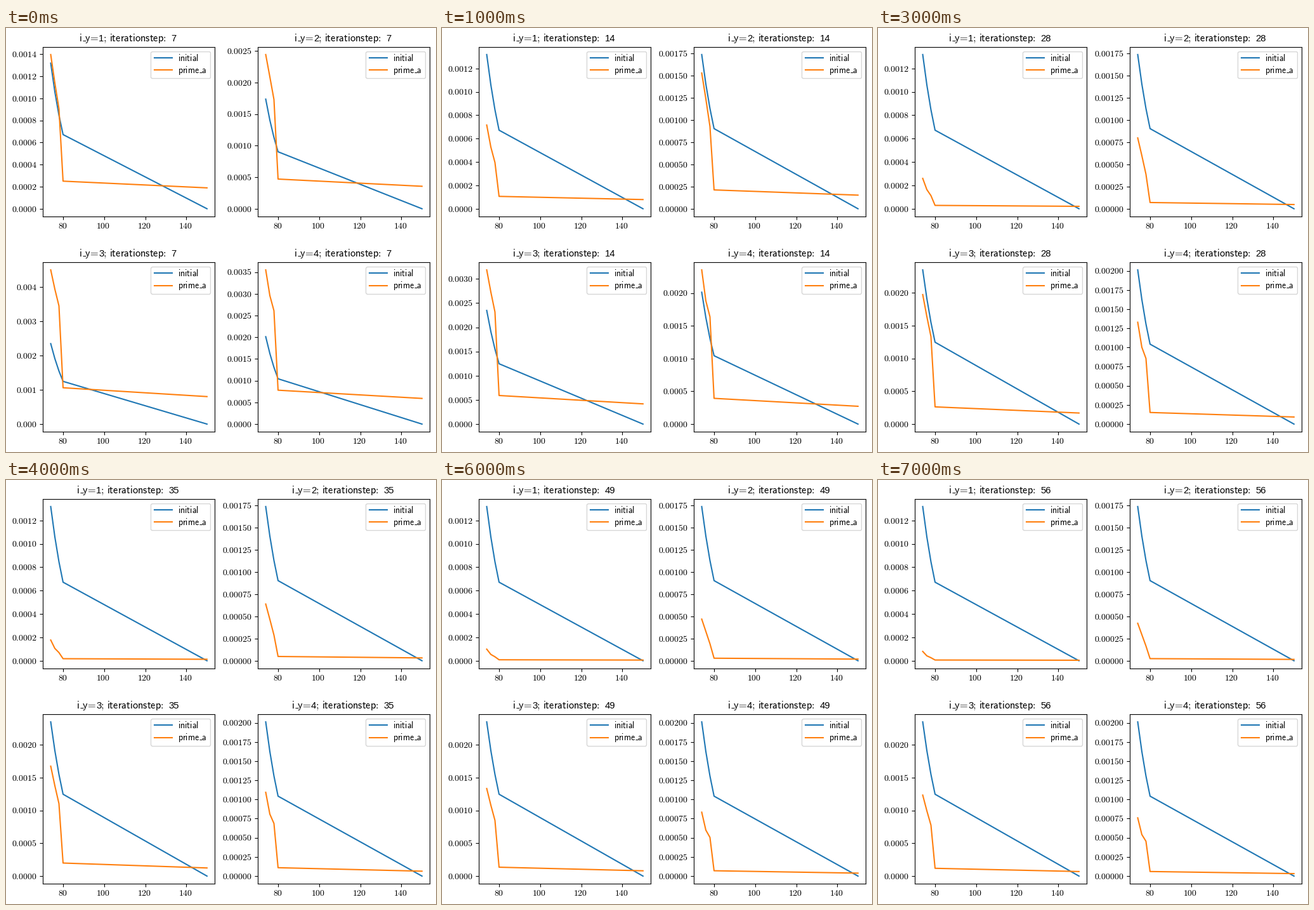
Recreate the animation shown at these times as a matplotlib script. Size 678 by 668 pixels, loop 8000 ms.

```python
import numpy as np
import matplotlib.pyplot as plt
from matplotlib.animation import FuncAnimation
from matplotlib.patches import FancyBboxPatch

plt.rcParams["mathtext.fontset"] = "cm"

W, H, DPI = 678, 668, 100
PX = DPI / 72                      # pixels per point
BLUE, ORANGE = "#1f77b4", "#ff7f0e"
AX_W, AX_H = 271, 267.2
LEFT, TOP = 58.2, 29.7
PITCH_X, PITCH_Y = 339, 339.25
TITLE = 11.75                      # title size in points
BACK = r"\hspace{-0.2}"            # cancels the space around relations

X = np.array([74, 76, 78, 80, 150])

# Per panel: height and power of the initial curve, decay rate,
# then start values and total log drop of prime_a at the first four x.
# Values are in units of 1e-6.
PANELS = [
    (1319, 8.2, 0.83, [1397, 1140, 907, 250], [3.93, 4.53, 4.88, 5.06]),
    (1736, 7.96, 0.78, [2442, 2090, 1730, 470], [2.13, 2.38, 2.84, 3.62]),
    (2348, 7.7, 0.78, [4500, 3940, 3450, 1060], [1.57, 1.67, 1.81, 2.66]),
    (2012, 7.99, 0.78, [3550, 2960, 2610, 780], [1.87, 2.06, 2.12, 3.12]),
]


def initial(panel):
    height, power = PANELS[panel][:2]
    return 1e-6 * height * ((150 - X) / 76) ** power


def prime(panel, frame):
    """Each point falls to its own limit, slower with every iteration."""
    rate, start, drop = PANELS[panel][2:]
    start = np.append(start, 0.757 * start[-1])
    drop = np.append(drop, drop[-1] + 0.11 + 0.1 * panel)
    return 1e-6 * start * np.exp(-drop * (1 - rate**frame))


def gap(em):
    # mathtext measures \hspace in widths of an italic m
    return r"\hspace{%.3f}" % (em / 0.878)


def math(stage, x, y, text, size=10):
    """Formula text with its origin on a whole pixel."""
    stage.text(round(x) - 1, round(y), f"${text}$", size=size, va="baseline")


def sans(stage, x, y, text, size=10):
    math(stage, x, y, r"\mathsf{" + text + "}", size)


def underscore(stage, x, y, em):
    y = round(y) - 1
    stage.plot([x + 0.06 * em, x + 0.36 * em], [y, y], color="black",
               lw=0.72, solid_capstyle="butt")


def title(stage, mid, y, panel, step):
    em = TITLE * PX
    x = round(mid - (8.86 + 0.5 * len(str(step))) * em / 2) - 1
    sans(stage, x, y, "i" + gap(0.36) + "y" + BACK + "=", TITLE)
    underscore(stage, x + 0.239 * em, y, em)
    sans(stage, x + 2.338 * em, y, ";", TITLE)
    sans(stage, x + 2.949 * em, y, "iterationstep" + BACK + ":", TITLE)
    for dx, number in ((1.838, panel + 1), (8.86, step)):
        stage.text(x + dx * em, round(y), str(number), size=0.91 * TITLE,
                   family="Liberation Sans", va="baseline")


def legend(stage, left, top):
    stage.add_patch(FancyBboxPatch(
        (left + 170.2, top + 6.94), 93.9, 42.7,
        boxstyle=f"round,pad=0,rounding_size={2 * PX}",
        fc="white", ec="0.8", lw=1, alpha=0.8, snap=True))
    for dy, color in ((17.2, BLUE), (36.6, ORANGE)):
        stage.plot([left + 175.8, left + 203.6], [top + dy] * 2,
                   color=color, lw=1.5)
    x, em = left + 213.8, 10 * PX
    sans(stage, x, top + 22.1, "initial")
    sans(stage, x, top + 41.4, "prime" + gap(0.36) + "a")
    underscore(stage, x + 2.336 * em, top + 41.4, em)


def number(stage, x, y, text, align):
    """Digits are half an em wide, the point 0.278 em."""
    points = text.count(".")
    width = (0.5 * (len(text) - points) + 0.278 * points) * 10 * PX
    bearing = 1 if text[0] == "1" else 0
    math(stage, round(x - align * width) - bearing, y, text)


def tick_labels(stage, ax, left, top):
    bottom = top + AX_H
    lo, hi = ax.get_xlim()
    for v in ax.get_xticks():
        number(stage, left + (v - lo) / (hi - lo) * AX_W, bottom + 19.3,
               f"{v:.0f}", 0.5)
    lo, hi = ax.get_ylim()
    ticks = ax.get_yticks()
    names = ax.yaxis.get_major_formatter().format_ticks(ticks)
    for v, name in zip(ticks, names):
        if lo <= v <= hi:
            y = bottom - (v - lo) / (hi - lo) * AX_H
            number(stage, left - 9.72, y + 4.8, name, 1)


def draw(frame):
    fig.clear()
    stage = fig.add_axes([0, 0, 1, 1], zorder=5)
    stage.set(xlim=(0, W), ylim=(H, 0), autoscale_on=False)
    stage.axis("off")
    for panel in range(4):
        left = LEFT + PITCH_X * (panel % 2)
        top = TOP + PITCH_Y * (panel // 2)
        ax = fig.add_axes([left / W, 1 - (top + AX_H) / H, AX_W / W, AX_H / H])
        ax.plot(X, initial(panel), color=BLUE, lw=1.5)
        ax.plot(X, prime(panel, frame), color=ORANGE, lw=1.5)
        ax.set_xticks(range(80, 141, 20))
        ax.tick_params(labelbottom=False, labelleft=False)
        tick_labels(stage, ax, left, top)
        title(stage, left + AX_W / 2, top - 8.6, panel, 7 * (frame + 1))
        legend(stage, left, top)
    return []


fig = plt.figure(figsize=(W / DPI, H / DPI), dpi=DPI, facecolor="white")
anim = FuncAnimation(fig, draw, frames=8, init_func=lambda: [],
                     interval=1000, repeat=True, repeat_delay=0)
plt.show()
```
